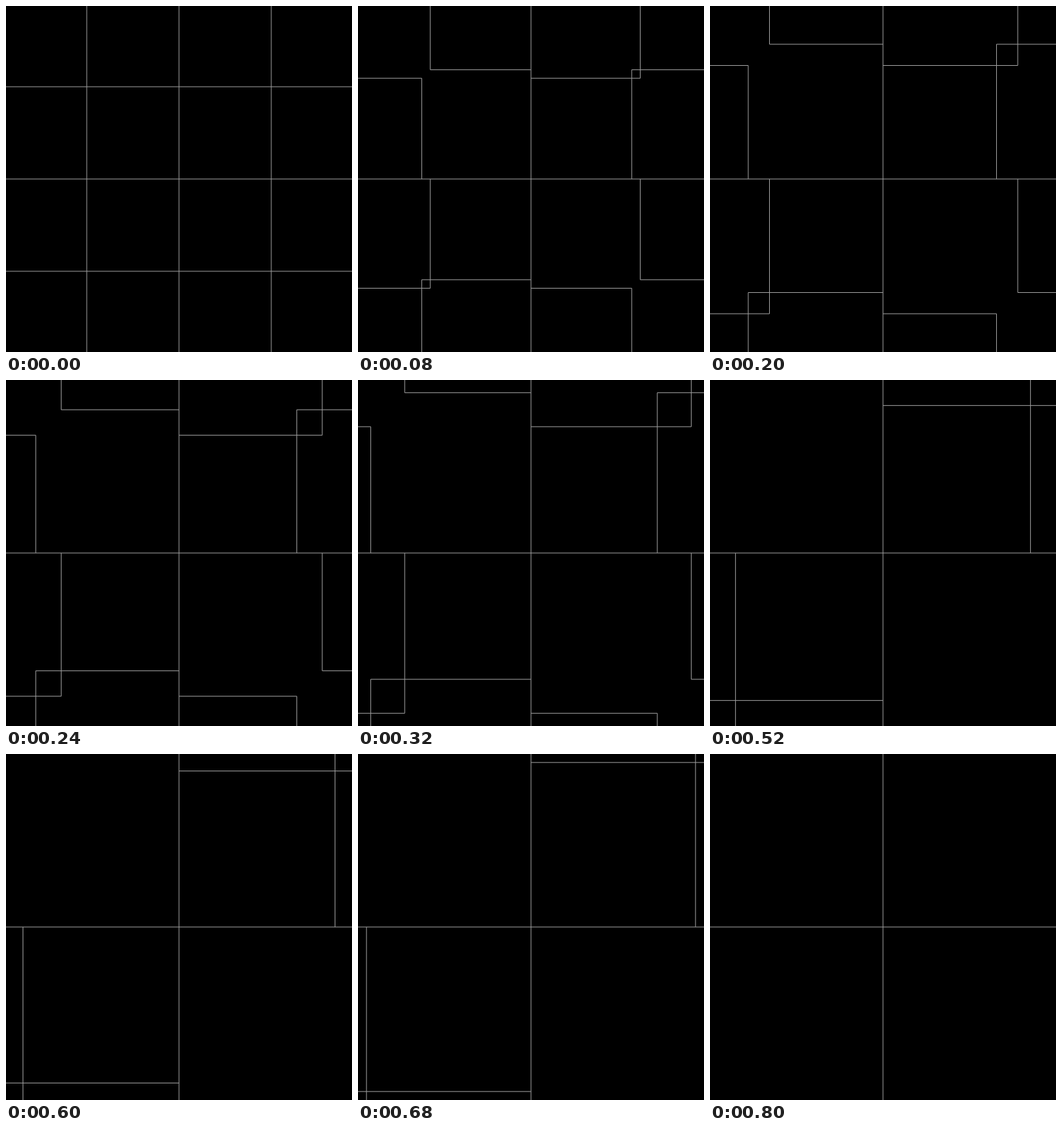
These frames come from a looping animation (480 px wide and 480 px high, 0.96 s). An HTML page with a canvas:

```html
<!DOCTYPE html>
<html>
<head>
<meta charset="utf-8">
<style>
  html, body { margin: 0; height: 100%; overflow: hidden; background: #000; }
  canvas { display: block; }
</style>
</head>
<body>
<canvas id="stage" width="480" height="480"></canvas>
<script>
const SIZE = 480, MID = 240, NEAR = 112, FAR = 368;
const LOOP = 960, STEP = 40, LAST_STEP = 20;
const SLOW = NEAR / 19; // pixels per step; the fast edges move twice as far
const ctx = document.getElementById('stage').getContext('2d');

function line(x1, y1, x2, y2) {
  ctx.moveTo(x1, y1);
  ctx.lineTo(x2, y2);
}

// A corner at (x, y) with one arm to endX and one to endY
function corner(x, y, endX, endY) {
  line(x, y, endX, y);
  line(x, y, x, endY);
}

function draw(now) {
  const step = Math.min(LAST_STEP, Math.floor((now % LOOP) / STEP));
  const slow = step * SLOW, fast = slow * 2;
  const nearSlow = NEAR - slow, nearFast = NEAR - fast;
  const farSlow = FAR + slow, farFast = FAR + fast;

  ctx.fillStyle = '#000';
  ctx.fillRect(0, 0, SIZE, SIZE);
  ctx.strokeStyle = '#999';
  ctx.beginPath();
  line(MID, 0, MID, SIZE);
  line(0, MID, SIZE, MID);

  corner(nearSlow, nearFast, MID, 0);
  corner(nearFast, nearSlow, 0, MID);
  corner(farFast, nearSlow, MID, 0);
  corner(farSlow, nearFast, SIZE, MID);

  corner(farSlow, farFast, MID, SIZE);
  corner(farFast, farSlow, SIZE, MID);
  corner(nearFast, farSlow, MID, SIZE);
  corner(nearSlow, farFast, 0, MID);
  ctx.stroke();

  requestAnimationFrame(() => draw(performance.now()));
}
draw(0);
</script>
</body>
</html>
```
